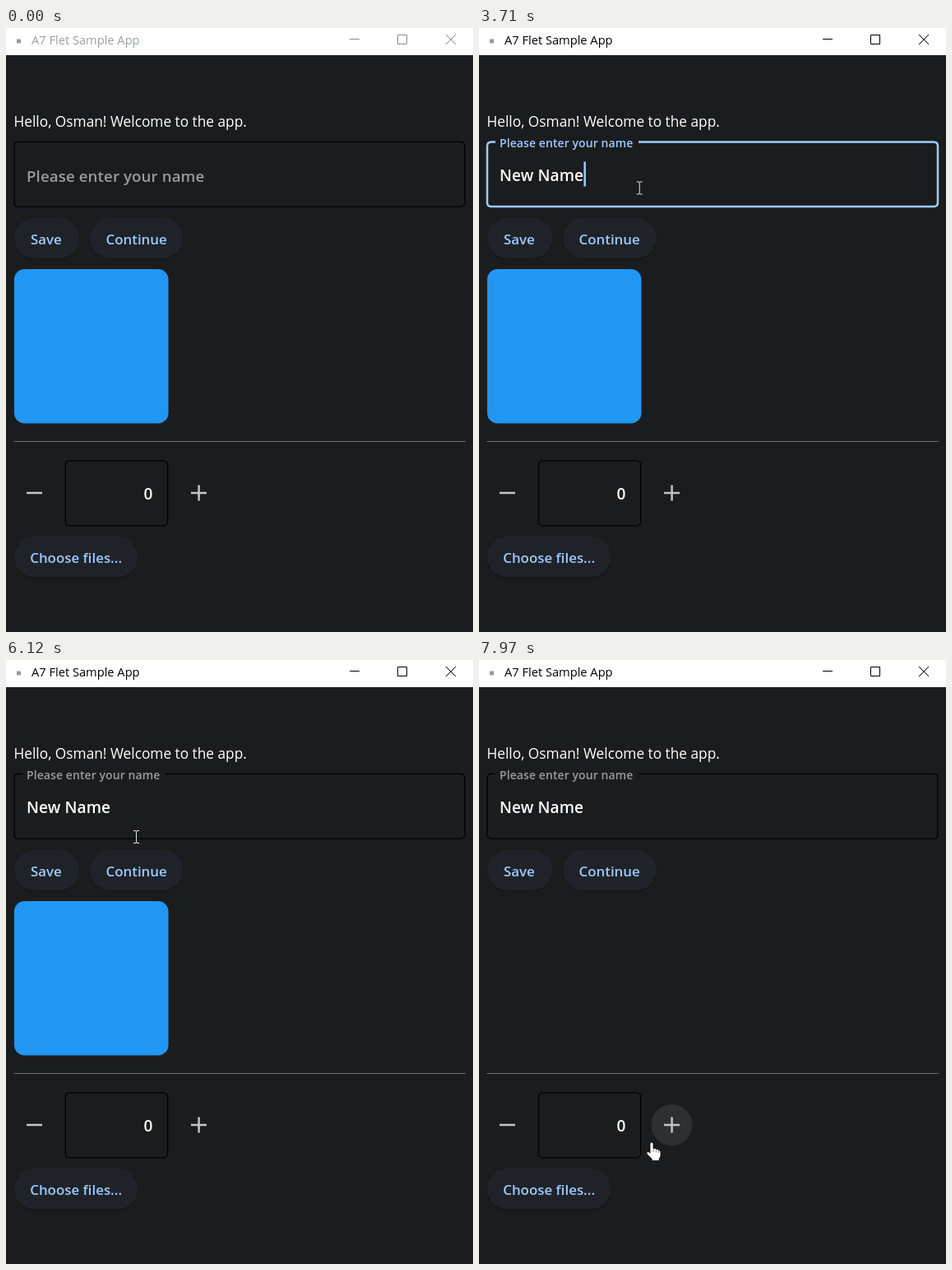
An HTML page that plays this animation: 568 px wide and 734 px high, repeating every 8000 ms.

```html
<!DOCTYPE html>
<html lang="en">
<head>
<meta charset="utf-8">
<title>A7 Flet Sample App</title>
<style>
html, body { margin: 0; width: 100%; height: 100%; overflow: hidden; background: #1b1c1e; }
svg { display: block; width: 568px; height: 734px; }
text { font-family: "Open Sans", "Noto Sans", sans-serif; fill: #fff; white-space: pre; }
.strong { font-weight: 600; font-size: 19.1px; letter-spacing: .1px; }
#label { font-size: 18.7px; }
.btn text { font-weight: 600; font-size: 16.9px; fill: #9ecaff; }
.btn rect { fill: #1f2228; }
.line { fill: none; stroke: #000; stroke-width: 1.25; }
.icon { fill: none; stroke: #c3c5ca; stroke-width: 2.5; }
.shape { fill: #fff; stroke: #000; stroke-width: .8; stroke-linejoin: round; }
</style>
</head>
<body>
<svg viewBox="0 0 568 734">
  <defs>
    <clipPath id="clipSave"><rect x="10" y="230.5" width="79.5" height="49.5" rx="24.7"/></clipPath>
    <clipPath id="clipNext"><rect x="102" y="230.5" width="113.5" height="49.5" rx="24.7"/></clipPath>
    <filter id="soft" x="-10%" y="-10%" width="120%" height="130%" color-interpolation-filters="sRGB">
      <feDropShadow dx="0" dy="1" stdDeviation="1" flood-color="#000" flood-opacity=".3"/>
    </filter>
  </defs>

  <rect width="568" height="734" fill="#1b1c1e"/>
  <rect width="568" height="33" fill="#fff"/>
  <rect x="13" y="13.5" width="5" height="5" fill="#999"/>
  <text id="title" x="31" y="20" font-size="14.65">A7 Flet Sample App</text>
  <path id="controls" fill="none" d="M418 13.5H430M476.5 8.5H487.5V19.5H476.5ZM535 8L547 20M547 8L535 20"/>

  <text x="9.5" y="120" font-size="17.3">Hello, Osman! Welcome to the app.</text>

  <path id="border" class="line"/>
  <text id="label" class="strong">Please enter your name</text>
  <text id="typed" class="strong" x="25" y="186"></text>
  <rect id="caret" y="162.5" width="2.5" height="30" fill="#9ecaff"/>

  <g class="btn">
    <rect id="save" x="10" y="230.5" width="79.5" height="49.5" rx="24.7" filter="url(#soft)"/>
    <g clip-path="url(#clipSave)"><circle id="rippleSave" cx="34" cy="248" fill="#9ecaff"/></g>
    <text x="30" y="263">Save</text>
    <rect id="next" x="102" y="230.5" width="113.5" height="49.5" rx="24.7" filter="url(#soft)"/>
    <g clip-path="url(#clipNext)"><circle id="rippleNext" cx="160" cy="256" fill="#9ecaff"/></g>
    <text x="121.5" y="263">Continue</text>
    <rect x="10" y="618" width="150.5" height="49.5" rx="24.7" filter="url(#soft)"/>
    <text x="29.2" y="650">Choose files...</text>
  </g>

  <rect id="square" x="10" y="293" width="187.5" height="187.5" rx="12.5" fill="#2196f3"/>
  <path d="M9.5 502.5H559" stroke="#6c6d70" stroke-width="1.2"/>

  <circle id="plusHover" cx="234.5" cy="565" r="25" fill="#2e2f32"/>
  <path class="icon" d="M25 565H44M225 565H244M234.6 555.5V574.5"/>
  <rect class="line" x="72.3" y="525.8" width="124.4" height="79" rx="5"/>
  <text class="strong" x="178.5" y="573" text-anchor="end">0</text>

  <g id="dialog">
    <rect y="33" width="568" height="701" fill="#000" opacity=".57"/>
    <rect x="75" y="321.5" width="418.5" height="125" rx="35" fill="#1b1c1e"/>
    <text x="105" y="384" font-size="28.2">You name has been saved !</text>
  </g>

  <circle id="press" r="15" fill="#92961f"/>
  <g id="pointer">
    <path id="arrow" class="shape" d="M0 0V15.5L3.6 12.1L6 17.8L8.4 16.8L6 11.3H10.8Z"/>
    <path id="beam" fill="none" stroke="#e4e4e4"
      d="M-3 -7.5H0L.5 -7L1 -7.5H4M.5 -7V7M-3 7.5H0L.5 7L1 7.5H4"/>
    <g id="hand">
      <path class="shape" d="M-2 2Q-2 0 0 0Q2 0 2 2V7.5Q4.5 6.5 5.3 8.4Q7.6 7.6 8.4 9.6Q11 9.2 11 12V16Q11 18.5 9.2 20V22.6H.3V20.6L-5.6 14.6Q-6.8 12.6 -5.2 11.6Q-3.6 11 -2 13.2Z"/>
      <path d="M2 8V12M5.3 9V12.5M8.4 10V13" stroke="#555" stroke-width=".7"/>
    </g>
  </g>
</svg>
<script>
const LOOP = 8000, STEP = 70;
const ui = {};
document.querySelectorAll('[id]').forEach(e => ui[e.id] = e);

const clamp = v => Math.max(0, Math.min(1, v));
const ramp = (t, a, b) => clamp((t - a) / (b - a));
const smooth = u => u * u * (3 - 2 * u);
const mix = (a, b, u) => a + (b - a) * u;
const within = (t, a, b) => t >= a && t < b;
const inBox = (p, x, y, w, h) => within(p.x, x, x + w) && within(p.y, y, y + h);
const rgb = (a, b, u) => `rgb(${a.map((v, i) => Math.round(mix(v, b[i], u)))})`;
const set = (e, attrs) => { for (const k in attrs) e.setAttribute(k, attrs[k]); };
const show = (e, on) => e.style.display = on ? '' : 'none';

const BLACK = [0, 0, 0], GREY = [154, 155, 159], BLUE = [158, 202, 255];
const FACE = [31, 34, 40], HOVER = [46, 57, 66];

// start time, steps, x, y
const MOVES = [
  [200, 8, 202, 192], [3710, 8, 34, 248], [4520, 3, 306, 305],
  [4890, 3, 354, 289], [5170, 1, 356, 285], [5600, 2, 361, 280],
  [5910, 4, 158, 215], [6190, 3, 155, 243], [6600, 2, 158, 254],
  [6930, 1, 161, 255], [7270, 5, 283, 328], [7760, 4, 210, 586]
];
// start, end
const PRESSES = [[890, 1030], [4340, 4480], [5240, 5380], [7130, 7200]];
const CARET = [[1030, 1500], [1970, 3740], [4240, 4400]];
const KEYS = [1970, 2310, 2380, 2450, 2780, 2910, 3110, 3240];
const NAME = 'New Name';

function pointerAt(t) {
  let x = 552, y = 693;
  for (const [start, n, tx, ty] of MOVES) {
    if (t < start) break;
    const u = smooth(clamp((Math.floor((t - start) / STEP) + 1) / n));
    x = mix(x, tx, u);
    y = mix(y, ty, u);
  }
  return { x, y };
}

function outline(float) {
  return `M${20 + 174 * float} 138.4H553Q558 138.4 558 143.4V212Q558 217 553 217H15Q10 217 10 212` +
    `V143.4Q10 138.4 15 138.4H20` + (float ? '' : 'Z');
}

function ripple(e, t, start) {
  const r = 12 + 11 * ramp(t, start, start + 70) + 90 * ramp(t, start + 70, start + 320);
  set(e, { r, opacity: within(t, start, start + 420) ? .12 * (1 - ramp(t, start + 200, start + 420)) : 0 });
}

function drawField(t) {
  const float = smooth(ramp(t, 930, 1130));
  const focus = ramp(t, 930, 1130) * (1 - ramp(t, 4390, 4560));
  set(ui.border, {
    d: outline(float),
    style: `stroke:${rgb(BLACK, BLUE, focus)};stroke-width:${mix(1.25, 2.5, focus)}`
  });
  const top = t < 3710 ? 145.7 : 145;
  ui.label.style.fill = rgb(GREY, BLUE, focus);
  set(ui.label, { transform: `translate(25 ${mix(187, top, float)}) scale(${mix(1, .75, float)})` });

  const text = NAME.slice(0, KEYS.filter(k => t >= k).length);
  if (ui.typed.textContent !== text) ui.typed.textContent = text;
  const width = text ? ui.typed.getComputedTextLength() : 0;
  set(ui.caret, { x: 25.2 + width });
  show(ui.caret, CARET.some(([a, b]) => within(t, a, b)));
}

function drawPointer(t, p, modal, hot) {
  const field = !modal && (inBox(p, 10, 138, 549, 80) || inBox(p, 72, 526, 125, 79));
  set(ui.pointer, { transform: `translate(${p.x} ${p.y})` });
  show(ui.pointer, t >= 200);
  show(ui.hand, hot);
  show(ui.beam, field && !hot);
  show(ui.arrow, !field && !hot);
  set(ui.press, { cx: p.x, cy: p.y });
  show(ui.press, PRESSES.some(([a, b]) => within(t, a, b)));
}

function draw(t) {
  const active = t >= 890;
  ui.title.style.fill = active ? '#000' : '#99a0a8';
  set(ui.controls, { stroke: active ? '#000' : '#8c8c8c' });

  const p = pointerAt(t);
  const modal = within(t, 4500, 5420);
  const onSave = !modal && inBox(p, 10, 230, 80, 50);
  const onNext = !modal && inBox(p, 102, 230, 114, 50);
  const onPlus = inBox(p, 209, 540, 51, 51);

  drawField(t);
  ui.save.style.fill = rgb(FACE, HOVER, +onSave);
  ui.next.style.fill = rgb(FACE, HOVER, +onNext);
  show(ui.plusHover, onPlus);
  ripple(ui.rippleSave, t, 4400);
  ripple(ui.rippleNext, t, 7130);
  set(ui.square, { opacity: 1 - smooth(ramp(t, 7270, 7610)) });

  const open = smooth(ramp(t, 4450, 4680)) * (1 - smooth(ramp(t, 5310, 5520)));
  set(ui.dialog, { opacity: open });
  drawPointer(t, p, modal, onSave || onNext || onPlus);
}

const t0 = performance.now();
function frame() {
  draw((performance.now() - t0) % LOOP);
  requestAnimationFrame(frame);
}
draw(0);
requestAnimationFrame(frame);
</script>
</body>
</html>
```
